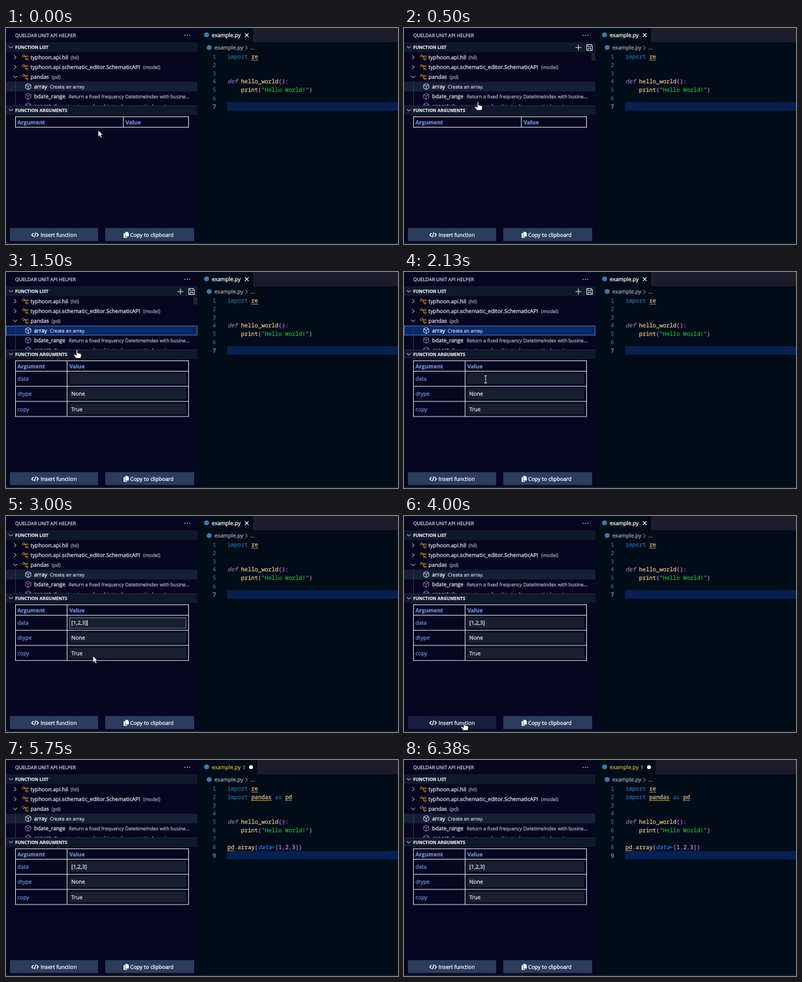
An HTML page with a canvas for the animation above (6.51 s loop, 600 by 332 pixels).

```html
<!DOCTYPE html>
<html lang="en">
<head>
<meta charset="utf-8">
<title>API helper panel</title>
<style>
  html, body { margin: 0; height: 100%; overflow: hidden; background: #060621; }
  canvas { display: block; }
</style>
</head>
<body>
<canvas id="stage" width="600" height="332"></canvas>
<script>
const ctx = document.getElementById('stage').getContext('2d');
ctx.textRendering = 'geometricPrecision';

const LOOP = 6510, STEP = 125;
const SELECT = 875, FOCUS_INPUT = 2250, PRESS = 3875, RELEASE = 4125, INSERT = 4250;
const UI = '"Open Sans", sans-serif', MONO = '"Noto Sans Mono", monospace';
const BLUE = '#6c8fd6', TAN = '#e2c08e', KEYWORD = '#2a659c', PALE = '#e2e2e8';
const ORCHID = '#da70d6', PINK = '#f280d0', WARN = '#cca53c';

// Pointer path: time, x, y
const path = [[0, 141, 157], [125, 141, 157], [750, 98, 89], [1125, 98, 89], [2000, 125, 165],
  [2750, 125, 165], [3000, 133, 215], [3125, 133, 215], [3750, 92, 316], [5375, 92, 316], [5875, 88, 345]];

function pointerAt(t) {
  const next = path.findIndex(p => p[0] > t);
  if (next < 0) return path[path.length - 1].slice(1);
  const [t0, x0, y0] = path[next - 1], [t1, x1, y1] = path[next];
  const u = (t - t0) / (t1 - t0), e = u * u * (3 - 2 * u);
  return [x0 + (x1 - x0) * e, y0 + (y1 - y0) * e];
}

function box(x, y, w, h, color) {
  ctx.fillStyle = color;
  ctx.fillRect(x, y, w, h);
}

function frame(x, y, w, h, color) {
  ctx.strokeStyle = color;
  ctx.lineWidth = 1;
  ctx.strokeRect(x, y, w, h);
}

function dot(x, y, r, color) {
  ctx.fillStyle = color;
  ctx.beginPath();
  ctx.arc(x, y, r, 0, 7);
  ctx.fill();
}

// Strokes and/or fills SVG path data moved to x, y
function shape(d, x, y, stroke, width = 1, fill) {
  const p = new Path2D(d);
  ctx.save();
  ctx.translate(x, y);
  ctx.lineJoin = 'round';
  if (fill) { ctx.fillStyle = fill; ctx.fill(p); }
  if (stroke) { ctx.strokeStyle = stroke; ctx.lineWidth = width; ctx.stroke(p); }
  ctx.restore();
}

// A hairline outline gives the small type its weight
function text(s, x, mid, color, size = 8.25, style = '', family = UI) {
  ctx.font = `${style} ${size}px ${family}`;
  ctx.fillStyle = ctx.strokeStyle = color;
  ctx.lineWidth = .25;
  ctx.fillText(s, x, mid + 3);
  ctx.strokeText(s, x, mid + 3);
  return ctx.measureText(s).width;
}

const chevronDown = (x, y) => shape('M-3-1.5L0 1.5L3-1.5', x, y, PALE);
const chevronRight = (x, y, color = PALE) => shape('M-1.5-3L1.5 0L-1.5 3', x, y, color);
const cube = (y, color) =>
  shape('M0-4.6L4-2.6V2.4L0 4.6L-4 2.4V-2.6ZM-4-2.6L0-.6L4-2.6M0-.6V4.6', 34, y, color, .9);
const module = y =>
  shape('M-4.5-2L-2-4L0-2L-2.5 0ZM-1-1.5H2M1-1.5V3H2M2-1.5L3.5-3L5-1.5L3.5 0ZM2 3L3.5 1.5L5 3L3.5 4.5Z',
    29, y, '#ee9d28', .9);

function section(title, y, h) {
  box(0, y, 293, h, '#10192c');
  chevronDown(7.5, y + h / 2);
  text(title, 14, y + h / 2 - .6, PALE, 6.75, 'bold');
}

function functionList(focused, hovered) {
  ctx.save();
  ctx.beginPath();
  ctx.rect(0, 37, 293, 82);
  ctx.clip();
  [['typhoon.api.hil', '(hil)', 99], ['typhoon.api.schematic_editor.SchematicAPI', '(model)', 210],
    ['pandas', '(pd)', 70]].forEach(([name, alias, x], i) => {
    const y = 45 + 15 * i;
    i < 2 ? chevronRight(14, y) : chevronDown(14, y);
    module(y);
    text(name, 37.5, y, PALE);
    text(alias, x, y, '#a4a6b2', 7.4);
  });
  box(0, 82.5, 293, 15, focused ? '#08286b' : '#152037');
  if (focused) frame(.5, 83, 292, 14, '#596f99');
  shape('M14.5 82.5V119', 0, 0, '#3a3c52', .8);
  [['array', 'Create an array.', 67],
    ['bdate_range', 'Return a fixed frequency DatetimeIndex with busine...', 96],
    ['concat', 'Concatenate pandas objects along a particular axis...', 73]].forEach(([name, note, x], i) => {
    const y = 90 + 15 * i;
    cube(y, i ? '#a478c8' : '#e4e4ea');
    text(name, 43, y, i ? PALE : '#fff');
    text(note, x, y, i ? '#acaebb' : '#c8ccd6', 7.4);
  });
  if (hovered) box(287, 38, 6, 12, '#1f2236');
  ctx.restore();
  if (focused || hovered) {
    shape('M-4.5 0H4.5M0-4.5V4.5', 267, 30, PALE);
    shape('M-4.5-4.5H3L4.5-3V4.5H-4.5ZM-2.5-4.5V-1H2.5V-4.5M-2.5 4.5V1.5H2.5V4.5', 284, 30, PALE, .9);
  }
}

function argumentTable(open, typed, editing) {
  const split = open ? 93.5 : 179.5, top = 152.5, row = 23.2;
  const bottom = open ? top + 3 * row : top;
  const line = '#d8dae0';
  frame(14.5, 136.5, 265, bottom - 136.5, line);
  shape(`M${split} 136.5V${bottom}`, 0, 0, line);
  text('Argument', 17.5, 144.5, BLUE, 8.4, 'bold');
  text('Value', split + 3.5, 144.5, BLUE, 8.4, 'bold');
  if (!open) return;
  [['data', typed], ['dtype', 'None'], ['copy', 'True']].forEach(([name, value], i) => {
    const y = top + row * (i + .5);
    shape(`M14.5 ${top + row * i}H279.5`, 0, 0, line);
    text(name, 17.5, y, BLUE);
    box(97, y - 8.5, 179, 17, '#181f2f');
    const width = text(value, 100, y, PALE);
    if (editing && !i) {
      frame(97.5, 156.5, 178, 16, '#596f99');
      box(100.5 + width, 160, .8, 9, '#fff');
    }
  });
}

function buttons(hovered, pressed) {
  box(6, 307.5, 135, 20, pressed ? '#161f3d' : hovered ? '#34486f' : '#2b3c5d');
  box(152, 307.5, 136, 20, '#2b3c5d');
  shape('M-2.5-2.8L-5 0L-2.5 2.8M1-3.6L-1 3.6M2.5-2.8L5 0L2.5 2.8', 44.5, 318, '#fff', 1.4);
  text('Insert function', 53, 317.5, '#fff', 8.15);
  shape('M-1.5-4.5H2L4-2.5V2.5H-1.5ZM-4-2.5H-2.2V3.3H1.5V4.5H-4Z', 184, 318, null, 1, '#fff');
  text('Copy to clipboard', 190, 317.5, '#fff', 8.15);
}

function codeLine(n, tokens) {
  const mid = 43.8 + 12.85 * (n - 1);
  let x = 339;
  for (const [s, color, style = '', underline] of tokens) {
    text(s, x, mid, color, 8.667, style, MONO);
    const width = s.length * 5.2;
    if (underline) box(x, mid + 5, width, 1, underline);
    x += width;
  }
}

function editor(inserted) {
  box(293, 0, 307, 332, '#000c18');
  const tabEnd = inserted ? 385 : 378;
  box(tabEnd, 0, 600 - tabEnd, 22, '#1c1c2a');
  dot(307, 10.5, 3.8, '#3b78ab');
  text('example.py', 315, 10.7, inserted ? WARN : '#fff');
  if (inserted) {
    text('1', 362, 10.7, WARN, 7.6);
    dot(375, 11, 3, '#fff');
  } else {
    shape('M-2.8-2.8L2.8 2.8M2.8-2.8L-2.8 2.8', 368.5, 11, '#fff', 1.2);
  }
  dot(311, 30, 3.8, '#3b78ab');
  text('example.py', 319, 30, '#a0a6b2');
  chevronRight(368, 30.5, '#a0a6b2');
  text('...', 374, 30, '#a0a6b2');

  const shift = inserted ? 1 : 0, last = inserted ? 9 : 7;
  box(338.5, 44 + 12.85 * (last - 1) - 7, 262, 13, '#082050');
  for (let n = 1; n <= last; n++)
    text(n, 316.3, 43.8 + 12.85 * (n - 1), n === last ? '#80a2c2' : '#406385', 8.667, '', MONO);

  codeLine(1, [['import ', KEYWORD], ['re', TAN, '', '#a8915c']]);
  if (inserted)
    codeLine(2, [['import ', KEYWORD], ['pandas', TAN, '', WARN], [' as ', KEYWORD], ['pd', TAN, '', '#a8915c']]);
  codeLine(4 + shift, [['def ', '#9966b8', 'italic'], ['hello_world', TAN], ['()', ORCHID], [':', BLUE]]);
  codeLine(5 + shift, [['    print', TAN], ['(', ORCHID], ['"Hello World!"', '#22aa44'], [')', ORCHID]]);
  if (inserted)
    codeLine(8, [['pd', TAN, '', '#a8915c'], ['.', BLUE], ['array', TAN], ['(', ORCHID],
      ['data', '#2277ff', 'italic'], ['=', KEYWORD], ['[', BLUE], ['1', PINK], [',', BLUE],
      ['2', PINK], [',', BLUE], ['3', PINK], [']', BLUE], [')', ORCHID]]);
}

function pointer(x, y, open) {
  const overButton = y > 307 && y < 328 && x < 141;
  if (y > 82 && y < 119 || overButton)
    shape('M-1 1Q0-.5 1 1V6L2.5 5.5L3.3 6.3L4.7 6L5.4 7L6.8 7V10L5.5 13.5H-1.5L-5 8.5Q-4.8 6.8-3 7.8L-1 9.2Z',
      x, y, '#111', .8, '#fff');
  else if (open && y > 155 && y < 175)
    shape('M-2-5.5H2M0-5.5V5.5M-2 5.5H2', x, y, '#e8e8ee', .9);
  else
    shape('M0 0V10.5L2.4 8.3L4 12L5.9 11.2L4.3 7.6H7.6Z', x, y, '#111', .8, '#fff');
}

function draw(t) {
  const [x, y] = pointerAt(t);
  const open = t >= SELECT, inserted = t >= INSERT;
  const typed = '[1,2,3]'.slice(0, Math.max(0, Math.floor((t - FOCUS_INPUT) / 80)));
  const typing = t > FOCUS_INPUT && t <= 2750;

  box(0, 0, 293, 332, '#060621');
  text('QUELDAR UNIT API HELPER', 14, 10.5, '#ccced8', 7.3);
  [274, 277.7, 281.4].forEach(cx => dot(cx, 11.3, .8, PALE));
  section('FUNCTION LIST', 22, 15);
  functionList(open && t < FOCUS_INPUT, y < 119);
  section('FUNCTION ARGUMENTS', 119, 14.5);
  box(0, 119, 293, .7, '#2b2b4a');
  argumentTable(open, typed, t >= FOCUS_INPUT && t < PRESS);
  buttons(y > 307 && y < 328, t >= PRESS && t < RELEASE);
  editor(inserted);
  box(0, 330, 600, 2, '#10192c');
  if (!typing) pointer(x, y, open);
}

function tick(now) {
  draw(Math.floor((now % LOOP) / STEP + .01) * STEP);
  requestAnimationFrame(tick);
}
requestAnimationFrame(tick);
</script>
</body>
</html>
```
